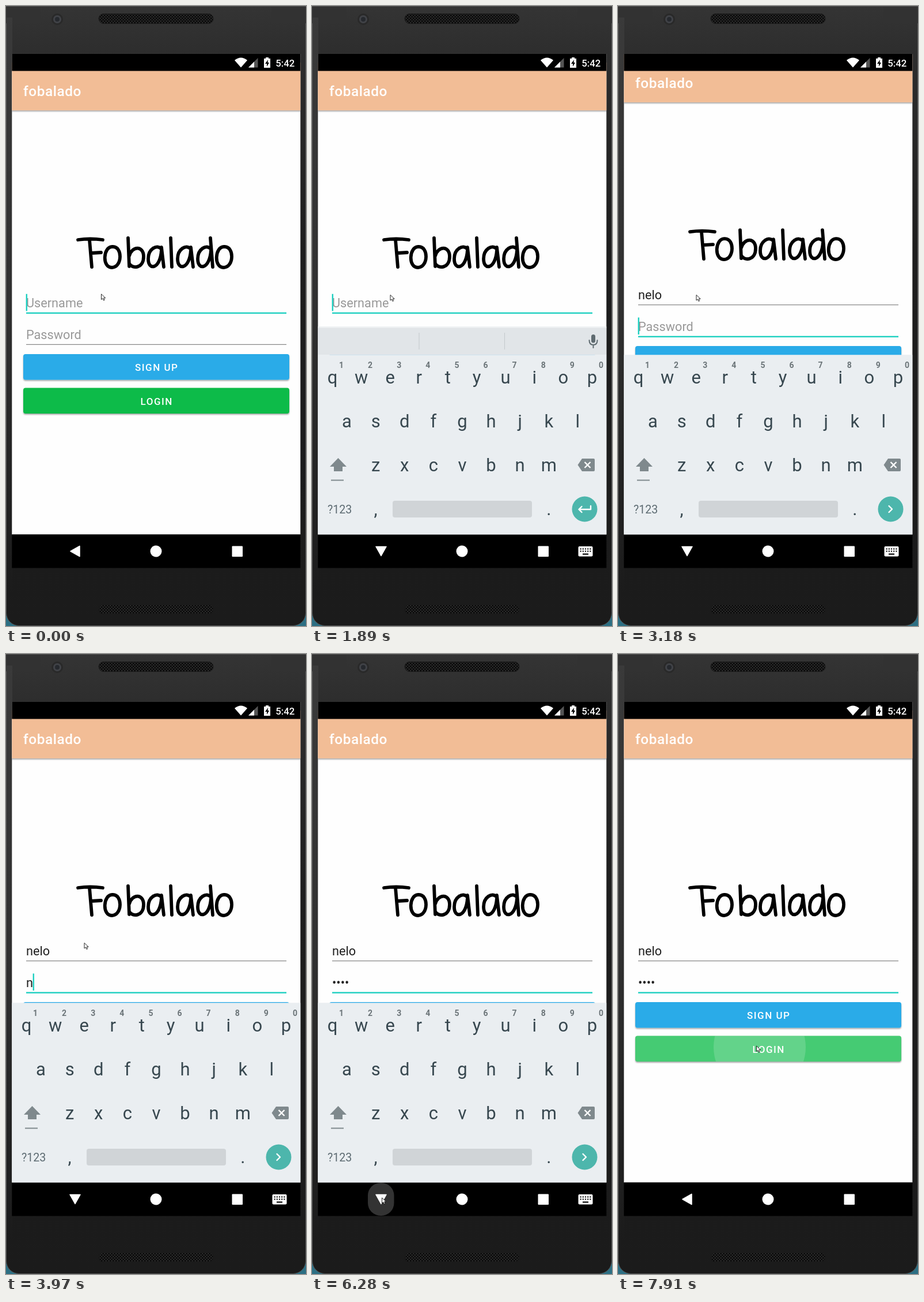
These frames come from a looping animation (521x1074 px, 8 s). An HTML page:

```html
<!DOCTYPE html>
<html lang="en">
<head>
<meta charset="utf-8">
<title>Login screen</title>
<style>
html, body { margin: 0; width: 100%; height: 100%; overflow: hidden; background: #2c6f83 }
svg { display: block; width: 100vw; height: 100vh; font-family: Roboto, sans-serif }
.mid { text-anchor: middle }
.field { font-size: 21.7px; fill: #1f1f1f }
.hint { fill: #999 }
.btn { font-size: 17px; font-weight: 500; fill: #fff; letter-spacing: 1.5px }
.key { font-size: 31px; fill: #37474f; text-anchor: middle }
.num { font-size: 14px; font-weight: 700; fill: #6b7478; text-anchor: middle }
.line { fill: none; stroke-linecap: round; stroke-linejoin: round }
</style>
</head>
<body>
<svg viewBox="0 0 521 1074">
  <defs>
    <linearGradient id="case" x2="0" y2="1">
      <stop stop-color="#343434"/><stop offset=".08" stop-color="#2d2d2d"/>
      <stop offset=".4" stop-color="#1d1d1d"/><stop offset="1" stop-color="#1b1b1b"/>
    </linearGradient>
    <linearGradient id="left" x2="0" y2="1">
      <stop stop-color="#3a3a3a"/><stop offset=".5" stop-color="#303030"/><stop offset="1" stop-color="#1b1b1b"/>
    </linearGradient>
    <pattern id="mesh" width="5" height="5" patternUnits="userSpaceOnUse">
      <rect width="5" height="5" fill="#272727"/>
      <circle cx="1.2" cy="1.2" r="1.2"/><circle cx="3.7" cy="3.7" r="1.2"/>
    </pattern>
    <filter id="drop" x="-5%" y="-20%" width="110%" height="160%">
      <feDropShadow dx="0" dy="1.8" stdDeviation="1.3" flood-opacity=".36"/>
    </filter>
    <clipPath id="loginBox"><rect x="30" y="661.5" width="462" height="44.5" rx="4"/></clipPath>
    <clipPath id="screen"><rect x="10.3" y="83" width="501" height="832.5"/></clipPath>
  </defs>

  <!-- phone -->
  <rect x=".5" y=".5" width="520" height="1073" rx="22" fill="url(#case)" stroke="#555"/>
  <path d="M0 0H60V30H0ZM461 0H521V30H461Z" fill="#323232"/>
  <rect x="1" y="20" width="10" height="1000" fill="url(#left)"/>
  <path d="M0 .5H521" stroke="#555"/>
  <circle cx="89" cy="23" r="10" fill="#292929"/>
  <circle cx="89" cy="23" r="7" fill="#404247"/><circle cx="89" cy="23" r="4" fill="#26292e"/>
  <g fill="url(#mesh)" stroke="#1a1a1a">
    <rect x="161" y="13.5" width="199" height="17" rx="8.5"/>
    <rect x="161" y="1036.5" width="199" height="17" rx="8.5"/>
  </g>

  <!-- app -->
  <g clip-path="url(#screen)">
    <rect x="10" y="83" width="502" height="833" fill="#fefefe"/>
    <g id="app">
      <rect x="10" y="98" width="502" height="82.7" fill="#f2bd96" filter="url(#drop)"/>
      <text x="30" y="156" font-size="24.4" font-weight="500" fill="#fff" letter-spacing=".55">fobalado</text>
      <path id="wordmark" class="line" stroke="#000" stroke-width="5.8" role="img" aria-label="Fobalado"/>
      <text class="field hint" id="userHint" x="35" y="522">Username</text>
      <text class="field" id="user" x="35" y="522"></text>
      <rect id="userLine" x="35" width="452"/>
      <text class="field hint" id="passHint" x="35" y="577">Password</text>
      <text class="field" id="pass" x="35" y="577"></text>
      <rect id="passLine" x="35" width="452"/>
      <rect id="caret" width="2.4" height="29.5" fill="#1fd0c1"/>
      <rect x="30" y="603" width="462" height="44.5" rx="4" fill="#29abe8" filter="url(#drop)"/>
      <rect x="30" y="661.5" width="462" height="44.5" rx="4" fill="#10bb48" filter="url(#drop)"/>
      <g clip-path="url(#loginBox)" fill="#fff">
        <rect id="glow" x="30" y="661" width="462" height="46"/>
        <circle id="ripple" cx="246" cy="681" opacity=".16"/>
      </g>
      <text class="btn" x="224" y="632">SIGN UP</text>
      <text class="btn" x="233.5" y="690.5">LOGIN</text>
    </g>
    <rect x="10" y="83" width="502" height="29.5"/>
    <path d="M397 94Q408 85 419 94L408 106.5Z" fill="#fff"/>
    <path d="M421 106.5L437.5 90V106.5Z" fill="#555"/>
    <path d="M421 106.5L431 96.5V106.5Z" fill="#fff"/>
    <path d="M448 91H451V89H456V91H459V107H448Z" fill="#fff"/>
    <path d="M455 93L450 100H453V105L457 98H454.5Z"/>
    <text x="468.3" y="104.5" font-size="16.8" font-weight="500" fill="#fff">5:42</text>
  </g>

  <!-- navigation bar -->
  <rect x="10.3" y="915.5" width="501" height="58"/>
  <rect id="press" x="97" y="916" width="45.5" height="57" rx="22" fill="#333"/>
  <g fill="#fff">
    <path id="back" d="M112 944.5L128 935.5V953.5Z" stroke="#fff" stroke-width="1.5" stroke-linejoin="round"/>
    <circle cx="260.5" cy="944.5" r="10"/>
    <rect x="392.5" y="935.5" width="18.5" height="18.5" rx="1"/>
    <g id="switcher">
      <rect x="462.5" y="936" width="25" height="17.5" rx="2"/>
      <path d="M465.5 940.5H485M465.5 944.5H485" stroke="#000" stroke-width="2.2" stroke-dasharray="2.2 2"/>
      <path d="M470 949.5H480" stroke="#000" stroke-width="2.2"/>
    </g>
  </g>

  <!-- keyboard -->
  <g id="board">
    <g id="strip">
      <rect x="10.3" y="555" width="501" height="3" fill="#eff2f3"/>
      <rect x="10.3" y="557.5" width="501" height="47" fill="#e1e5e8"/>
      <path d="M186 566V595M334.5 566V595" stroke="#c3c9cc"/>
      <rect x="485" y="569" width="7" height="14.5" rx="3.5" fill="#5f6b70"/>
      <path class="line" d="M481.5 579Q481.5 587 488.5 587T495.5 579M488.5 587V592" stroke="#5f6b70" stroke-width="2"/>
      <g id="words" class="mid" font-size="20" fill="#37474f"><text x="98" y="587"/><text x="260" y="587"/><text x="407" y="587"/></g>
    </g>
    <rect x="10.3" y="604.3" width="501" height="311.2" fill="#eaeef1"/>
    <g id="keys"></g>
    <path d="M45.5 783L60 798H53V806H38V798H31Z" fill="#7f898d"/>
    <path d="M33 821.5H55" stroke="#7f898d" stroke-width="2"/>
    <path d="M461.5 795L469 784H489Q491 784 491 786V804Q491 806 489 806H469Z" fill="#7f898d"/>
    <path d="M473.5 790L483.5 800M483.5 790L473.5 800" stroke="#fff" stroke-width="2.4"/>
    <text x="27" y="879" font-size="19.6" fill="#5d6b72">?123</text>
    <rect x="140" y="857" width="242" height="29" rx="4" fill="#d0d4d7"/>
    <circle cx="473.5" cy="871.5" r="22" fill="#4db6ac"/>
    <path id="enter" class="line" stroke="#fff" stroke-width="2.4"/>
  </g>

  <path id="mouse" d="M.5 .5V10L2.8 8L4.5 11.5L6.2 10.7L4.6 7.3H7.7Z" fill="#fff" stroke="#111" stroke-width=".9"/>
</svg>
<script>
const $ = id => document.getElementById(id);
const set = (id, attrs) => { for (const k in attrs) $(id).setAttribute(k, attrs[k]); };
const show = (id, on) => set(id, { visibility: on ? 'visible' : 'hidden' });
const say = (el, text) => { if (el.textContent !== text) el.textContent = text; };

// Handwritten letters: pen strokes starting at x
const o = x => `M${x + 15} 417c-16-1-19 36-1 36c18 0 19-37 1-36`;
const bowl = x => `M${x + 23} 421c-8-9-23 0-23 17c0 21 21 18 23-15`;
const a = x => `${bowl(x)}M${x + 23} 418l4 34`;
const d = x => `${bowl(x)}M${x + 22} 402l4 50`;
const b = x => `M${x} 402l2 49M${x + 2} 433c5-18 25-18 25 1c0 21-20 22-25 12`;
const l = x => `M${x} 402l2 50`;
set('wordmark', { d: 'M125 405Q146 402 168 405M145 405L149 452M148 428L165 427'
  + o(170) + b(212) + a(247) + l(286) + a(298) + d(333) + o(364) });

// Keys sit on a grid of ten columns
const row = (chars, col, y, cls = 'key') => [...chars].map((c, i) =>
  `<text class="${cls}" x="${35.5 + 50.1 * (col + i)}" y="${y}">${c}</text>`).join('');
$('keys').innerHTML = row('1234567890', .31, 626.5, 'num')
  + ['qwertyuiop', 'asdfghjkl', 'zxcvbnm', ',     .']
    .map((chars, i) => row(chars, [0, .5, 1.5, 1.5][i], 653.5 + 76.3 * i)).join('');

const ramp = (t, from, to) => Math.min(1, Math.max(0, (t - from) / (to - from)));
const smooth = u => u * u * (3 - 2 * u);

const NAME = 'nelo', BLINK = 480;
const OPEN = 630, TYPE_NAME = 2010, NEXT = 3180, TYPE_PASS = 3970, CLOSE = 6280, TAP = 7750;

// Index of the newest letter when one is typed every `gap` ms, -1 before the first
const newest = (t, start, gap) => Math.min(NAME.length - 1, Math.max(-1, Math.floor((t - start) / gap)));

// Mouse glides: start, end, x, y
const glides = [[0, 1, 165, 498.5], [150, 1080, 135.5, 500], [4860, 5100, 180, 471], [5100, 5340, 209, 911],
  [5480, 5610, 182, 1030], [5840, 6280, 121, 941.5], [6540, 6920, 233, 644], [7090, 7210, 240, 678.5]];
const mouseAt = t => glides.reduce(([x, y], [from, to, nx, ny]) => {
  const u = smooth(ramp(t, from, to));
  return [x + (nx - x) * u, y + (ny - y) * u];
}, [165, 498.5]);

const underline = (id, y, on) => set(id, on
  ? { y: y - .3, height: 2.4, fill: '#1fd0c1' } : { y, height: 1.2, fill: '#858585' });

function draw() {
  const t = performance.now() % 8000;
  const inPass = t >= NEXT;
  const userKey = newest(t, TYPE_NAME, 200), passKey = newest(t, TYPE_PASS, 170);
  const lastPress = TYPE_PASS + 170 * passKey;
  const name = NAME.slice(0, userKey + 1);
  const secret = passKey < 0 ? ''
    : '•'.repeat(passKey) + (t < lastPress + 380 ? NAME[passKey] : '•');

  set('app', { transform: `translate(0 ${inPass ? -14 * (1 - ramp(t, NEXT, NEXT + 200)) : 0})` });
  say($('user'), name);
  say($('pass'), secret);
  show('userHint', !name);
  show('passHint', !secret);
  underline('userLine', 531, !inPass);
  underline('passLine', 585.8, inPass);

  // The caret restarts its blink on focus and on each key
  const since = passKey >= 0 ? lastPress : inPass ? NEXT
    : userKey >= 0 ? TYPE_NAME + 200 * userKey : t >= OPEN ? OPEN : 0;
  const typed = $(inPass ? 'pass' : 'user');
  const width = typed.textContent ? typed.getComputedTextLength() : 0;
  set('caret', { x: 34.6 + width, y: inPass ? 553.5 : 498.8 });
  show('caret', Math.floor((t - since) / BLINK) % 2 === 0);

  const tap = ramp(t, TAP, TAP + 150);
  set('glow', { opacity: .23 * tap });
  set('ripple', { r: 80 * tap });

  const alpha = ramp(t, OPEN + 60, OPEN + 160) - ramp(t, CLOSE + 90, CLOSE + 230);
  set('board', { opacity: alpha, transform: `translate(0 ${55 * (1 - alpha)})` });
  set('strip', { display: inPass ? 'none' : 'inline' });
  ['', 't', 'w'].forEach((end, i) => say($('words').children[i], name && name + end));
  set('enter', { d: inPass ? 'M470.5 866L476 871.5L470.5 877'
    : 'M484 866V872H463.5M468.5 867L463.5 872L468.5 877' });

  const turn = ramp(t, OPEN - 130, OPEN) - ramp(t, CLOSE + 90, CLOSE + 230);
  set('back', { transform: `rotate(${-90 * turn} 120 944.5)` });
  set('press', { opacity: t < CLOSE ? 0 : 1 - ramp(t, CLOSE, CLOSE + 640) });
  show('switcher', t >= OPEN && t < CLOSE + 230);
  set('mouse', { transform: `translate(${mouseAt(t)})` });
  requestAnimationFrame(draw);
}
draw();
</script>
</body>
</html>
```
